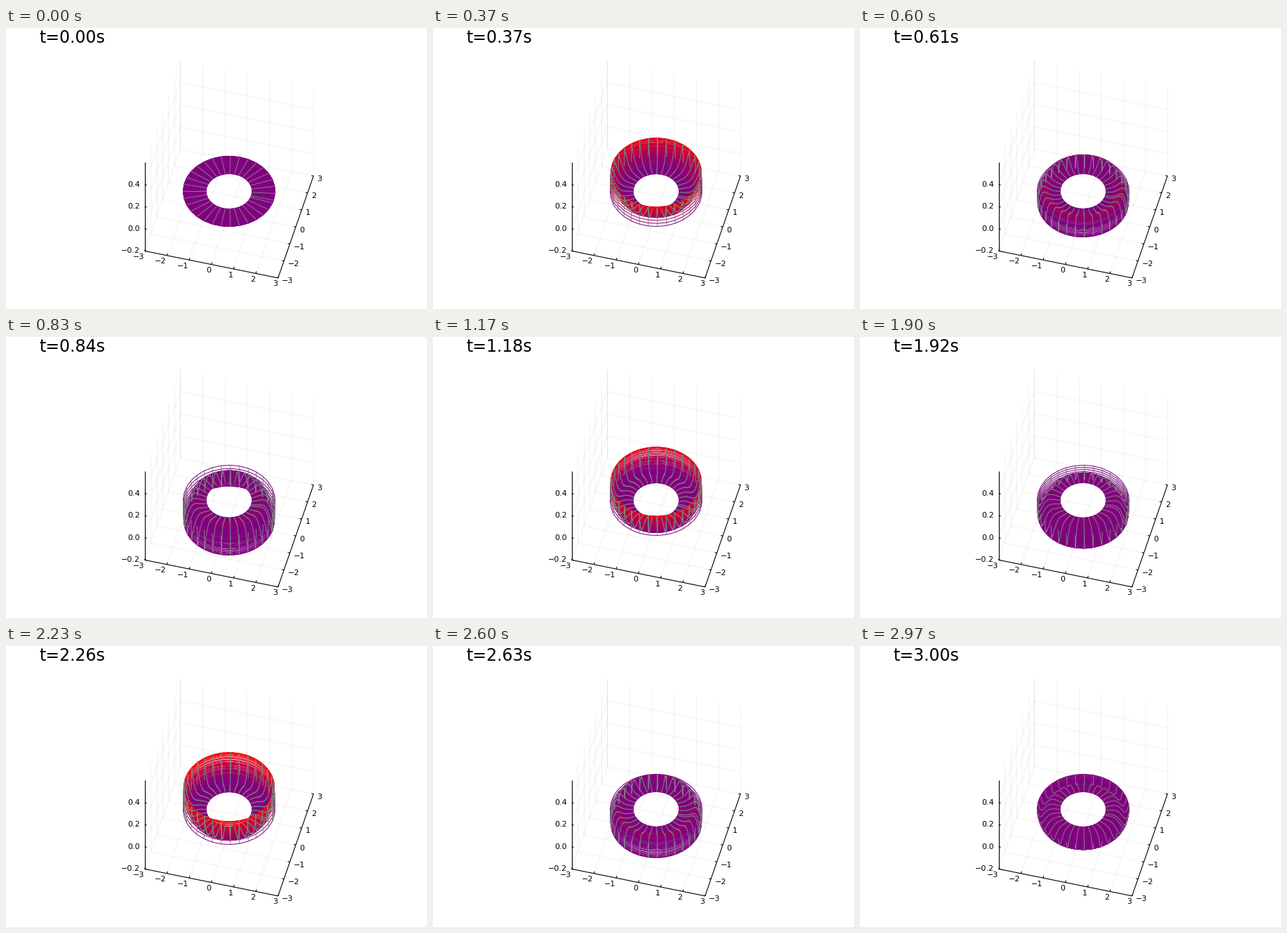
Write a matplotlib script that moves like this. It is 600x400 px and loops after 3.01 s.

```python
import numpy as np
import matplotlib.pyplot as plt
from matplotlib.animation import FuncAnimation
from matplotlib.collections import LineCollection

plt.rcParams["font.family"] = "DejaVu Sans"

W, H, DPI = 600, 400, 100
PX = 72 / DPI
TICKS, STEPS = 301, 90        # 10 ms ticks, 30 states per second
T_END = 3.0
KAPPA, AMP, OMEGA, MODES = 0.1, 0.2, 2 * np.pi, 28
PURPLE, RED = np.array([128, 0, 128]) / 255, np.array([255, 0, 0]) / 255


def project(x, y, z):
    """Orthographic view of the box, in pixels."""
    x, y, z = np.broadcast_arrays(x, y, z)
    u = 317.95 + 31.67 * x + 8.42 * y
    v = 232.5 + 6.4 * x - 24.2 * y - 157.5 * z
    return np.stack([u, v], axis=-1)


# Heat flow on the annulus 1 < r < 2, outer rim driven by a sine.
# depth = distance from the outer rim; finer where the surface is steep.
depth = np.concatenate([np.arange(120) / 300, np.linspace(0.4, 1, 76)])
radius = 2 - depth
theta = np.append(np.arange(0, 2 * np.pi, 0.2), 2 * np.pi)
k = np.pi * np.arange(1, MODES + 1)
shapes = np.sin(np.outer(depth, k)) * np.sqrt(2 / radius)[:, None]
ring_x = radius[:, None] * np.cos(theta)
ring_y = radius[:, None] * np.sin(theta)


def height(t):
    lam = KAPPA * k**2
    wave = lam * np.sin(OMEGA * t) - OMEGA * np.cos(OMEGA * t)
    coef = 2 * KAPPA * k * AMP * (wave + OMEGA * np.exp(-lam * t))
    return shapes @ (coef / (lam**2 + OMEGA**2))


fig = plt.figure(figsize=(W / DPI, H / DPI), dpi=DPI, facecolor="white")
ax = fig.add_axes([0, 0, 1, 1])
ax.set_xlim(0, W)
ax.set_ylim(H, 0)
ax.axis("off")


def add_lines(segments, color, width, order):
    lines = LineCollection(segments, colors=color, linewidths=width * PX,
                           zorder=order)
    ax.add_collection(lines)
    return lines


def seg(p, q):
    return np.array([project(*p), project(*q)])


def label(pos, dx, dy, text, align):
    ax.text(pos[0] + dx, pos[1] + dy, text.replace("-", "\u2212"), fontsize=8,
            ha=align, va="center_baseline", zorder=5)


LO, HI, ZLO, ZHI = -3, 3, -0.2, 0.6
grid, marks = [], []
for c in range(LO, HI + 1):
    grid += [seg((c, LO, ZLO), (c, HI, ZLO)), seg((c, HI, ZLO), (c, HI, ZHI)),
             seg((LO, c, ZLO), (HI, c, ZLO)), seg((LO, c, ZLO), (LO, c, ZHI))]
    marks += [seg((c, LO, ZLO), (c, LO + 0.12, ZLO)),
              seg((HI, c, ZLO), (HI - 0.09, c, ZLO))]
    label(project(c, LO, ZLO), -0.7, 7.6, str(c), "right")
    label(project(HI, c, ZLO), 5.3, 3.5, str(c), "left")
for z in (-0.2, 0.0, 0.2, 0.4):
    if z > ZLO:
        grid += [seg((LO, LO, z), (LO, HI, z)), seg((LO, HI, z), (HI, HI, z))]
    marks.append(seg((LO, LO, z), (LO + 0.09, LO, z)))
    label(project(LO, LO, z), -6.5, -1, f"{z:.1f}", "right")

spines = [seg((LO, LO, ZLO), (LO, LO, ZHI)), seg((LO, LO, ZLO), (HI, LO, ZLO)),
          seg((HI, LO, ZLO), (HI, HI, ZLO))]
add_lines(grid, (0, 0, 0, 0.1), 0.55, 1)
add_lines(spines + marks, "black", 1.1, 2)

rings = add_lines([], "purple", 1, 3)
spokes = add_lines([], "gray", 1, 4)
title = ax.text(47, 21.2, "", fontsize=17, ha="left", va="baseline")


def draw(tick):
    step = min(int(0.3 * tick + 0.15), STEPS - 1)
    t = T_END * step / (STEPS - 1)
    z = height(t)
    mesh = project(ring_x, ring_y, z[:, None])
    mix = np.clip(z / AMP, 0, 1)[:, None]
    # inner rings first, outer rim last
    rings.set_segments(list(mesh[::-1]))
    rings.set_color((PURPLE + mix * (RED - PURPLE))[::-1])
    spokes.set_segments(list(mesh[:, :-1].transpose(1, 0, 2)))
    title.set_text(f"t={t:.2f}s")
    return rings, spokes, title


anim = FuncAnimation(fig, draw, frames=TICKS, interval=10, repeat=True,
                     repeat_delay=0, init_func=lambda: draw(0))
plt.show()
```
